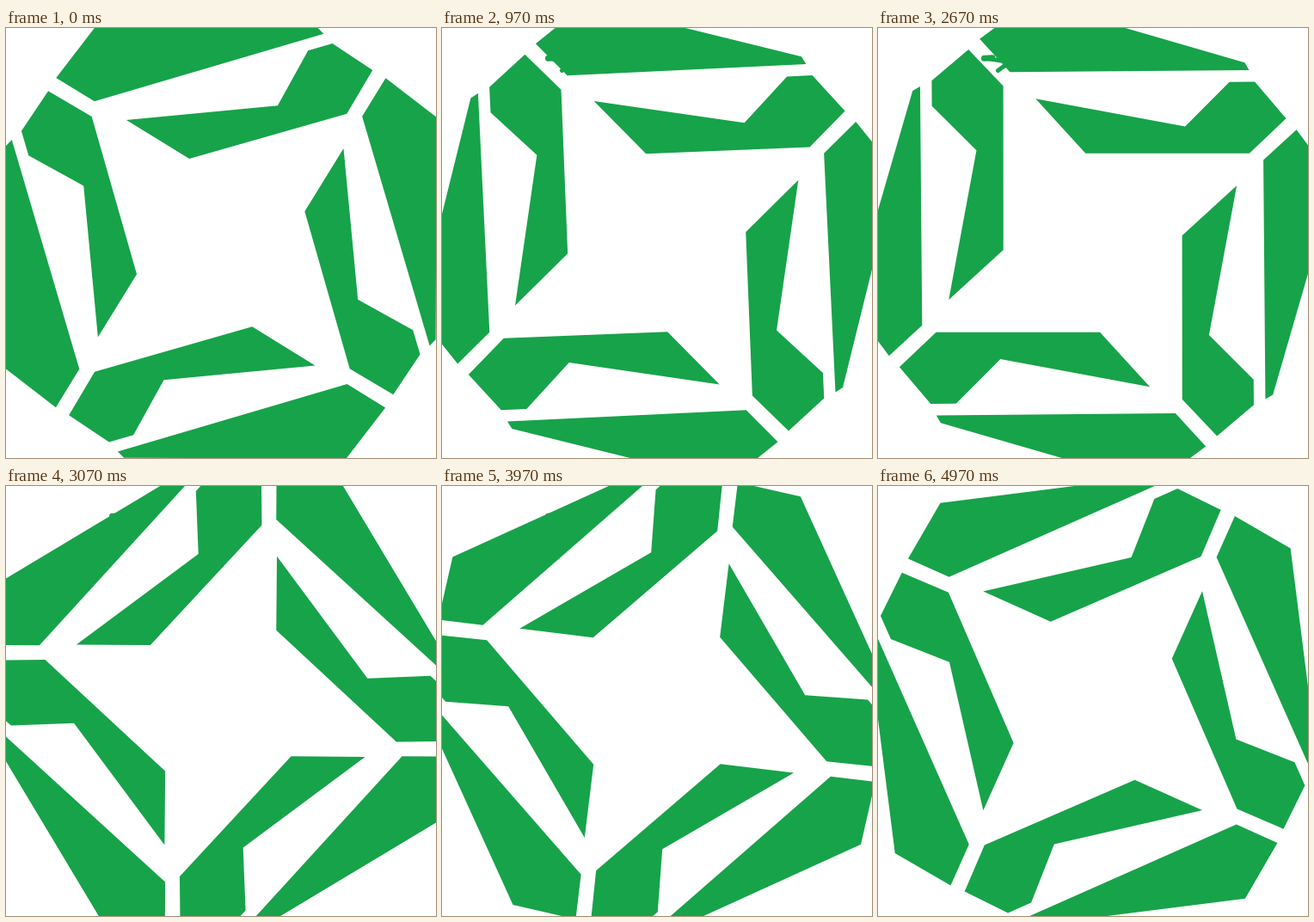
An HTML page with a canvas that plays this animation: 500 by 500 pixels, repeating every 5010 ms.

```html
<!DOCTYPE html>
<html lang="en">
<head>
<meta charset="utf-8">
<title>Spinning square</title>
<style>
html, body { margin: 0; width: 100%; height: 100%; overflow: hidden; background: #fff; }
canvas { display: block; width: 500px; height: 500px; }
</style>
</head>
<body>
<canvas id="stage" width="500" height="500"></canvas>
<script>
const ctx = document.getElementById('stage').getContext('2d');
const GREEN = '#17a34a';
const CENTRE = 249.7;
const LOOP = 5010, LAST = 149;
const START = -16.4, STEP = 3.574; // degrees, degrees per tick

// One side of the square around its centre: the arm, then the rim
const side = new Path2D(
  'M-65-168 L108.5-134.3 L160.5-185.7 H190 L226-142.6 L183-102.5 L-7.5-104 Z' +
  'M-94.5-199.2 L-129.5-238 L-69-282 L178.5-208 L183.5-199.2 Z'
);

// Small fixed sprig: two leaves and a twig
const leaf = new Path2D('M123.5 35.3 L133 34.8');
const twig = new Path2D('M130 36 L147 38.5 M139.5 49.5 L149 42.5');

// Thirty ticks a second, each starting on a whole hundredth
function tickAt(ms) {
  return Math.min(LAST, Math.floor((Math.floor(ms / 10) + 0.5) * 0.3));
}

function draw(ms) {
  ctx.fillStyle = '#fff';
  ctx.fillRect(0, 0, 500, 500);
  ctx.fillStyle = ctx.strokeStyle = GREEN;
  ctx.lineCap = 'round';

  ctx.save();
  ctx.translate(CENTRE, CENTRE);
  ctx.rotate((START + STEP * tickAt(ms)) * Math.PI / 180);
  for (let i = 0; i < 4; i++) {
    ctx.fill(side);
    ctx.rotate(Math.PI / 2);
  }
  ctx.restore();

  ctx.lineWidth = 7;
  ctx.stroke(leaf);
  ctx.lineWidth = 5;
  ctx.stroke(twig);
}

const begin = performance.now();
function frame() {
  draw((performance.now() - begin) % LOOP);
  requestAnimationFrame(frame);
}
frame();
</script>
</body>
</html>
```
